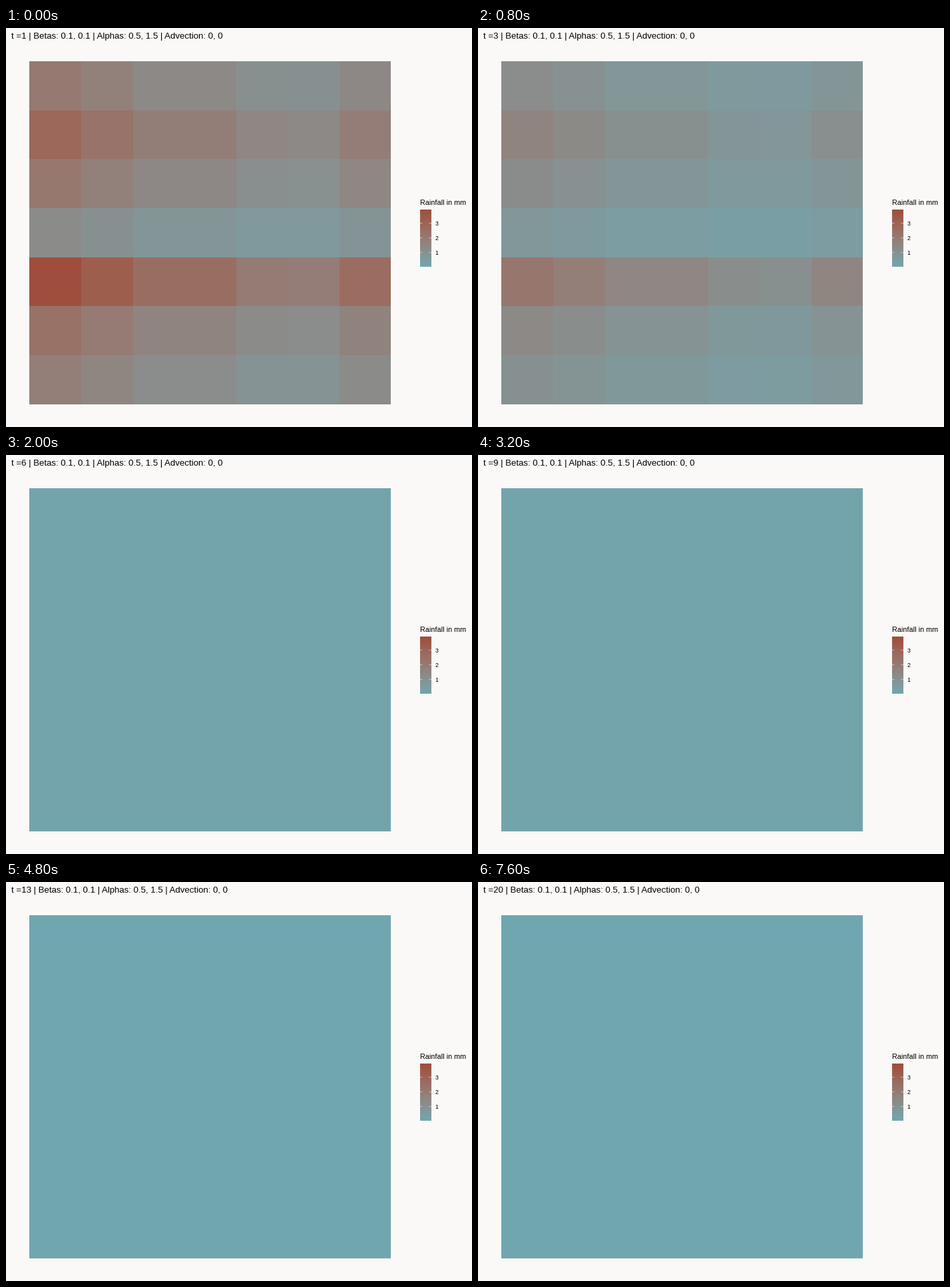
A matplotlib script that plays this animation: 700x600 px, repeating every 8 s.

```python
import numpy as np
import matplotlib.pyplot as plt
from matplotlib.animation import FuncAnimation
from matplotlib.colors import ListedColormap, to_rgb

W, H, DPI = 700, 600, 72
STEPS, STEP_MS = 20, 400
BACKGROUND, LOW, HIGH = "#faf9f7", "#70a6af", "#9f4e3c"

plt.rcParams["font.family"] = "Liberation Sans"

# The field is separable: one factor per row times one factor per column
ROW_RAIN = [.53, .72, .54, .31, 1, .61, .46]
COLUMN_RAIN = [1, .83, .65, .65, .5, .48, .67]
RAIN = np.outer(ROW_RAIN, COLUMN_RAIN)
X_EDGES = np.linspace(35.4, 578.4, 8).round()
Y_EDGES = np.linspace(49.85, 565.75, 8).round()

RGB_TO_XYZ = np.array([[.4124, .3576, .1805],
                       [.2126, .7152, .0722],
                       [.0193, .1192, .9505]])
WHITE = RGB_TO_XYZ.sum(axis=1)
XYZ_TO_LAB = np.array([[0, 116, 0], [500, -500, 0], [0, 200, -200]])


def to_lab(color):
    c = np.array(to_rgb(color))
    linear = np.where(c > .04045, ((c + .055) / 1.055) ** 2.4, c / 12.92)
    return XYZ_TO_LAB @ np.cbrt(RGB_TO_XYZ @ linear / WHITE) - [16, 0, 0]


def to_srgb(lab):
    fy = (lab[:, 0] + 16) / 116
    f = np.stack([fy + lab[:, 1] / 500, fy, fy - lab[:, 2] / 200], axis=1)
    linear = np.clip(f ** 3 * WHITE @ np.linalg.inv(RGB_TO_XYZ).T, 0, 1)
    return np.where(linear > .0031308, 1.055 * linear ** (1 / 2.4) - .055, 12.92 * linear)


def lab_gradient(low, high, n=256):
    t = np.linspace(0, 1, n)[:, None]
    return ListedColormap(to_srgb((1 - t) * to_lab(low) + t * to_lab(high)))


def rain_at(step):
    """Gaussian decay in time over a faint, slowly vanishing floor."""
    floor = .03 * np.clip((12 - step) / 4, 0, 1)
    return np.maximum(RAIN * np.exp(-.145 * step ** 2), floor)


fig = plt.figure(figsize=(W / DPI, H / DPI), dpi=DPI, facecolor=BACKGROUND)
ax = fig.add_axes([0, 0, 1, 1])
ax.axis("off")
cmap = lab_gradient(LOW, HIGH)

mesh = ax.pcolormesh(X_EDGES, Y_EDGES, RAIN, cmap=cmap, vmin=0, vmax=1,
                     antialiased=False, edgecolors="none")
title = ax.text(8, 16, "", fontsize=13.2)

ax.text(621.5, 266, "Rainfall in mm", fontsize=10.7)
ax.imshow(np.linspace(1, 0, 86)[:, None], cmap=cmap, vmin=0, vmax=1, aspect="auto",
          extent=(622, 639, 359, 273), interpolation="nearest")
for value in (1, 2, 3):
    y = 359.5 - 22 * value
    for x in (622, 635.5):
        ax.plot([x, x + 3.5], [y, y], color="white", lw=.5, snap=False,
                solid_capstyle="butt")
    ax.text(644.3, y + 3.2, str(value), fontsize=8.8)

ax.set(xlim=(0, W), ylim=(H, 0))


def update(step):
    mesh.set_array(rain_at(step))
    title.set_text(f"t ={step + 1} | Betas: 0.1, 0.1 | Alphas: 0.5, 1.5 | Advection: 0, 0")
    return mesh, title


anim = FuncAnimation(fig, update, frames=STEPS, interval=STEP_MS,
                     repeat=True, repeat_delay=0)
plt.show()
```
